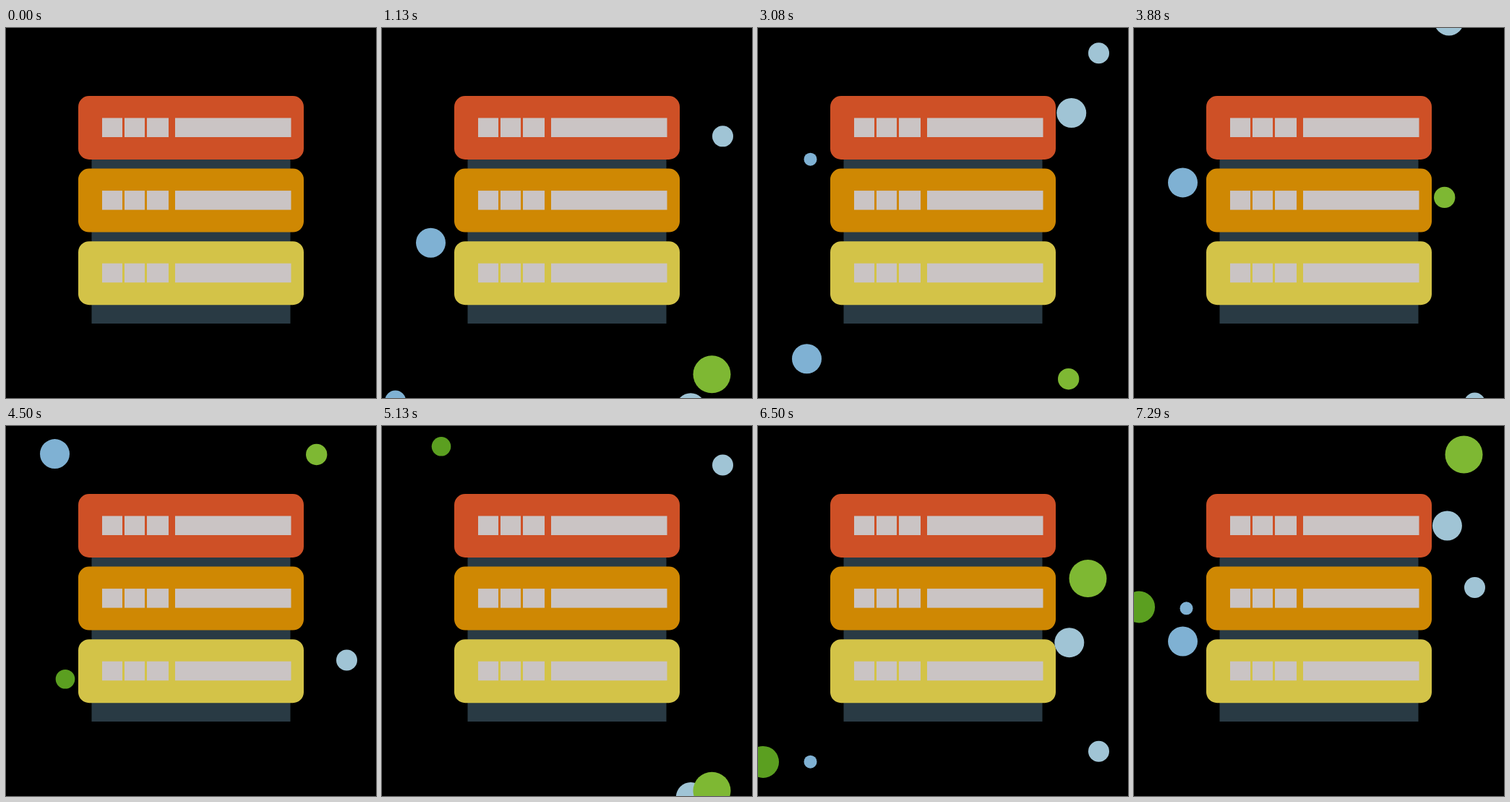
These frames come from a looping animation (512 px wide and 512 px high, 7330 ms). An HTML page with a canvas:

```html
<!DOCTYPE html>
<html lang="en">
<head>
<meta charset="utf-8">
<title>Server stack with bubbles</title>
<style>
  html, body { margin: 0; width: 100%; height: 100%; overflow: hidden; background: #000; }
  canvas { display: block; width: 100vw; height: 100vh; }
</style>
</head>
<body>
<canvas id="stage" width="512" height="512"></canvas>
<script>
const ctx = document.getElementById('stage').getContext('2d');
const SIZE = 512, LOOP = 7330;
const TEAL = '#7fb1d3', PALE = '#a0c4d5', LIME = '#7eb833', LEAF = '#5b9f20';

// Each rise is [start, duration] in ms.
const bubbles = [
  { x: 67.5, r: 20.5, color: TEAL, rises: [[0, 2500], [2460, 2590], [6510, 1730]] },
  { x: 18.5, r: 14.5, color: TEAL, rises: [[970, 1800], [5120, 1300]] },
  { x: 72.5, r: 9, color: TEAL, rises: [[1959, 1900], [5931, 2696]] },
  { x: 82, r: 13.3, color: LEAF, rises: [[3941, 1450]] },
  { x: 7, r: 22, color: LEAF, rises: [[5847, 2852]] },
  { x: 427, r: 20.5, drift: 9, color: PALE, rises: [[900, 3270], [4640, 4140]] },
  { x: 429.7, r: 14.7, color: LIME, rises: [[0, 1080], [2673, 2299]] },
  { x: 471.5, r: 14.5, color: PALE, rises: [[0, 1800], [1914, 1450], [3745, 1804], [5840, 2696]] },
  { x: 456.5, r: 26, color: LIME, rises: [[629, 2400], [4589, 3470]] }
];

const ease = u => (1 - Math.cos(Math.PI * u)) / 2;

function rect(x, y, w, h, color) {
  ctx.fillStyle = color;
  ctx.fillRect(x, y, w, h);
}

function drawServer() {
  rect(118.5, 170, 275, 239, '#293a44');
  ['#ce5026', '#cf8803', '#d3c348'].forEach((color, i) => {
    const y = 94 + i * 100.6;
    ctx.fillStyle = color;
    ctx.beginPath();
    ctx.roundRect(100, y, 312, 88, 15);
    ctx.fill();
    for (const [x, w] of [[133, 28], [164, 28], [195, 30], [234, 160.5]])
      rect(x, y + 30.5, w, 26.5, '#cac4c4');
  });
}

function drawBubble({ x, r, color, rises, drift = 0 }, t) {
  ctx.fillStyle = color;
  for (const [start, duration] of rises) {
    const u = (t - start) / duration;
    if (u <= 0 || u >= 1) continue;
    const p = ease(u);
    ctx.beginPath();
    ctx.arc(x + drift * p, SIZE + r - p * (SIZE + 2 * r), r, 0, 2 * Math.PI);
    ctx.fill();
  }
}

const origin = performance.now();

function draw() {
  const t = (performance.now() - origin) % LOOP;
  rect(0, 0, SIZE, SIZE, '#000');
  drawServer();
  bubbles.forEach(b => drawBubble(b, t));
  requestAnimationFrame(draw);
}
draw();
</script>
</body>
</html>
```
